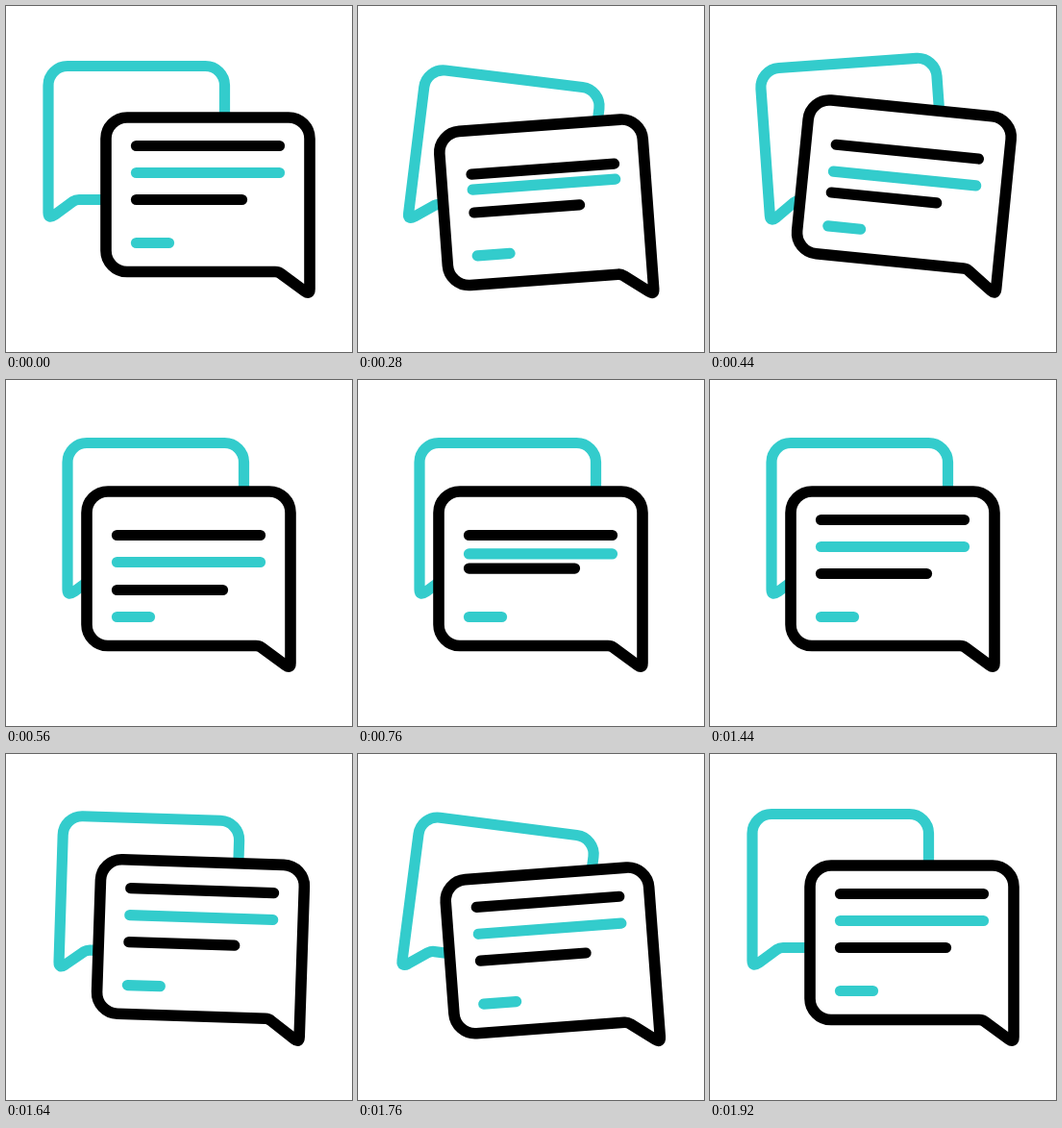
Write an HTML page that moves like this. It is 360 px wide and 360 px high and loops after 2000 ms.

```html
<!DOCTYPE html>
<html lang="en">
<head>
<meta charset="utf-8">
<title>Speech bubbles</title>
<style>
  html, body { margin: 0; width: 100%; height: 100%; overflow: hidden; background: #fff; }
  svg { display: block; width: 100vw; height: 100vh; }
  path { stroke-linecap: round; stroke-linejoin: round; stroke-width: 11.2; fill: none; }
  .ink { stroke: #000; }
  .teal { stroke: #33cccc; }
  #front > .ink:first-child { fill: #fff; stroke-width: 11.6; }
</style>
</head>
<body>
<svg viewBox="0 0 360 360">
  <g id="back">
    <path class="teal" d="M130 201.5H76Q72.500 201.500 69.500 203.500L50.500 217.500Q44 222 44 215V82.500A20 20 0 0 1 64 62.500H207.500A20 20 0 0 1 227.500 82.500V140"/>
  </g>
  <g id="front">
    <path class="ink" d="M126 276.500A22 22 0 0 1 104 254.500V138A22 22 0 0 1 126 116H294A22 22 0 0 1 316 138V294.500Q316 300.500 311 296.800L286 278.500Q283.500 276.500 280 276.500Z"/>
    <path class="ink" id="line1" d="M135.500 145.500H284.500"/>
    <path class="teal" id="line2" d="M135.500 173.500H284.500"/>
    <path class="ink" id="line3" d="M135.500 201.500H245.500"/>
    <path class="teal" d="M135.500 246.500H169.500"/>
  </g>
</svg>
<script>
  const LOOP = 2000, STEP = 40;

  // Each track is a list of [time in ms, value], eased between neighbours.
  const tracks = {
    slide: [[100, 0], [510, 1], [1480, 1], [1820, 0]],
    frontLean: [[80, 0], [280, -4.2], [400, 7], [540, 0], [1480, 0], [1560, 8.8], [1720, -5], [1880, 0]],
    backLean: [[80, 0], [280, 7], [400, -5], [540, 0], [1480, 0], [1560, -5], [1720, 8.6], [1880, 0]],
    line1: [[80, 0], [280, 16], [800, 16], [960, -6], [1120, 0]],
    line2: [[220, 0], [400, 16], [700, 16], [840, -6], [940, 0]],
    line3: [[340, 0], [520, 17], [600, 17], [740, -6], [840, 0]]
  };

  const ease = p => (1 - Math.cos(Math.PI * p)) / 2;

  function valueAt(track, t) {
    const i = track.findIndex(key => key[0] > t);
    if (i === 0) return track[0][1];
    if (i < 0) return track[track.length - 1][1];
    const [t0, v0] = track[i - 1], [t1, v1] = track[i];
    return v0 + (v1 - v0) * ease((t - t0) / (t1 - t0));
  }

  const place = (id, transform) =>
    document.getElementById(id).setAttribute("transform", transform);

  function draw(t) {
    const at = name => valueAt(tracks[name], t);
    const slide = at("slide");
    // Both bubbles rock on the tips of their tails.
    place("front", `translate(${-20 * slide} 0) rotate(${at("frontLean")} 316 297)`);
    place("back", `translate(${20 * slide} ${3 * slide}) rotate(${at("backLean")} 47 219)`);
    for (const id of ["line1", "line2", "line3"]) place(id, `translate(0 ${at(id)})`);
  }

  const start = performance.now();
  function tick() {
    const t = (performance.now() - start) % LOOP;
    draw(Math.floor(t / STEP) * STEP);
    requestAnimationFrame(tick);
  }
  tick();
</script>
</body>
</html>
```
